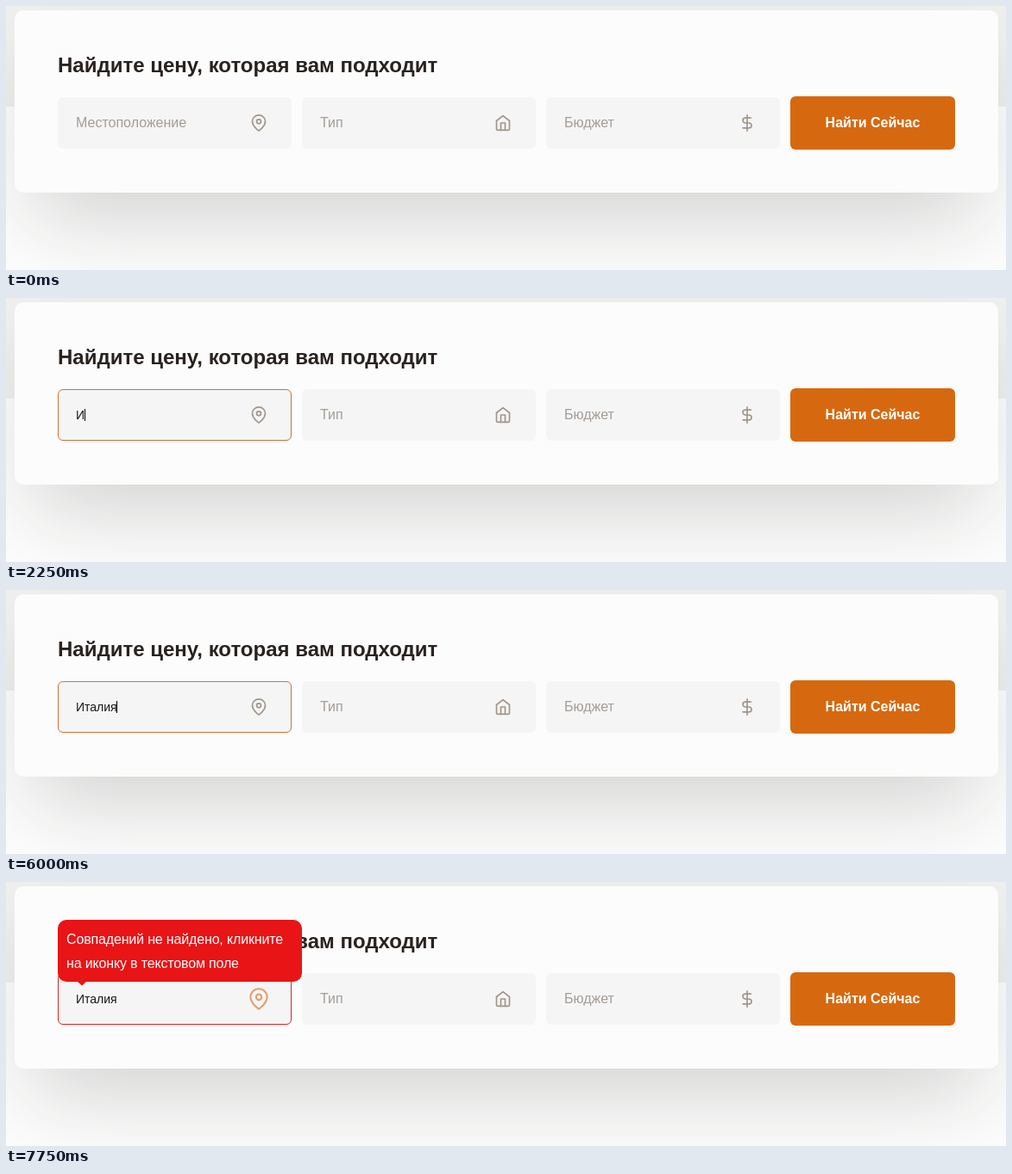
An HTML page that plays this animation: 1159x307 px, repeating every 8 s.

```html
<!DOCTYPE html>
<html lang="ru">
<head>
<meta charset="utf-8">
<title>Поиск по цене</title>
<style>
  html, body { margin: 0; width: 100%; height: 100%; overflow: hidden; }
  body { background: #fdfdfd; }
  .stage { position: relative; width: 1159px; height: 307px; overflow: hidden; }
  .band { position: absolute; left: 0; top: 0; width: 100%; height: 117px; background: #efefee; }
  .card {
    position: absolute; left: 10px; top: 5px; width: 1140px; height: 212px;
    border-radius: 10px; background: #fcfcfc;
    box-shadow: 0 50px 100px -20px rgba(28, 25, 23, .19);
  }
  svg { position: absolute; left: 0; top: 0; }
  text { font: 16px "Liberation Sans", Arial, sans-serif; white-space: pre; }
  .title { font-size: 24px; font-weight: 700; fill: #29221f; }
  .hint { fill: #a49d97; }
  .typed { font-size: 14px; fill: #1a1817; }
  .action { font-weight: 700; fill: #fff; text-anchor: middle; }
  .tip text { fill: #fff; letter-spacing: -.01em; }
  .field { fill: #f5f5f5; }
  .icon { fill: none; stroke: #a0958b; stroke-width: 2; stroke-linecap: round; stroke-linejoin: round; }
</style>
</head>
<body>
<div class="stage">
  <div class="band"></div>
  <div class="card"></div>
  <svg width="1159" height="307" viewBox="0 0 1159 307">
    <text class="title" x="60" y="77">Найдите цену, которая вам подходит</text>
    <g id="fields"></g>
    <rect id="ring" x="60.5" y="106.5" width="270" height="59" rx="5.5" fill="none"/>
    <text id="typed" class="typed" x="81" y="141"></text>
    <rect id="caret" y="129" width="1" height="14" fill="#000"/>
    <rect x="909" y="105" width="191" height="62" rx="6" fill="#d66910"/>
    <text class="action" x="1004.5" y="141">Найти Сейчас</text>
    <g id="tip" class="tip">
      <path d="M70 44H333a10 10 0 0 1 10 10V106a10 10 0 0 1-10 10H93L88 120.5 83 116H70a10 10 0 0 1-10-10V54a10 10 0 0 1 10-10z" fill="#e81416"/>
      <text x="70" y="72">Совпадений не найдено, кликните</text>
      <text x="70" y="100">на иконку в текстовом поле</text>
    </g>
  </svg>
</div>
<script>
const LOOP = 8000;
const WORD = 'Италия';
const CARET_X = [81, 91, 97, 105, 113, 121, 128];
const ICON_COLOR = '#a0958b';

const FIELDS = [
  ['Местоположение', 'M21 10c0 7-9 13-9 13s-9-6-9-13a9 9 0 0 1 18 0zM15 10a3 3 0 1 1-6 0 3 3 0 0 1 6 0z'],
  ['Тип', 'M3 9l9-7 9 7v11a2 2 0 0 1-2 2H5a2 2 0 0 1-2-2zM9 22V12h6v10'],
  ['Бюджет', 'M12 1v22M17 5H9.5a3.5 3.5 0 0 0 0 7h5a3.5 3.5 0 0 1 0 7H6'],
];

// Each step overrides only the values that change at its time.
const STEPS = [
  [0, { letters: 0, caret: false, ring: 'none', tip: 0, pin: ICON_COLOR, scale: 1 }],
  [1000, { caret: true, ring: '#d9a983' }],
  [1250, { ring: '#cb7434' }],
  [1500, { caret: false }],
  [2000, { caret: true }],
  [2250, { letters: 1 }],
  [2750, { letters: 2 }],
  [3250, { letters: 3 }],
  [3750, { letters: 4 }],
  [4000, { letters: 5 }],
  [4500, { letters: 6 }],
  [5000, { caret: false }],
  [5500, { caret: true }],
  [6250, { caret: false }],
  [6750, { caret: true }],
  [7250, { caret: false }],
  [7500, { ring: '#c8553a', tip: 0.38, pin: '#b99b80', scale: 1.12 }],
  [7750, { ring: '#cf2a2c', tip: 1, pin: '#e3a06e', scale: 1.28 }],
];

const byId = id => document.getElementById(id);
const [ring, typed, caret, tip] = ['ring', 'typed', 'caret', 'tip'].map(byId);

const iconPlace = (x, scale) =>
  `translate(${x} 136) scale(${scale * 20 / 24}) translate(-12 -12)`;

byId('fields').innerHTML = FIELDS.map(([label, path], i) => {
  const x = 60 + i * 283;
  return `<rect class="field" x="${x}" y="106" width="271" height="60" rx="6"/>
    <text class="hint" x="${x + 21}" y="141">${label}</text>
    <path class="icon" d="${path}" transform="${iconPlace(x + 233, 1)}"/>`;
}).join('');

const hint = document.querySelector('.hint');
const pin = document.querySelector('.icon');

function stateAt(time) {
  const past = STEPS.filter(([start]) => start <= time);
  return Object.assign({}, ...past.map(([, change]) => change));
}

function draw(time) {
  const s = stateAt(time);
  typed.textContent = WORD.slice(0, s.letters);
  hint.style.opacity = s.letters ? 0 : 1;
  caret.setAttribute('x', CARET_X[s.letters]);
  caret.style.opacity = s.caret ? 1 : 0;
  ring.style.stroke = s.ring;
  tip.style.opacity = s.tip;
  pin.style.stroke = s.pin;
  pin.setAttribute('transform', iconPlace(293, s.scale));
}

const begin = performance.now();
function tick() {
  draw((performance.now() - begin) % LOOP);
  requestAnimationFrame(tick);
}
tick();
</script>
</body>
</html>
```
